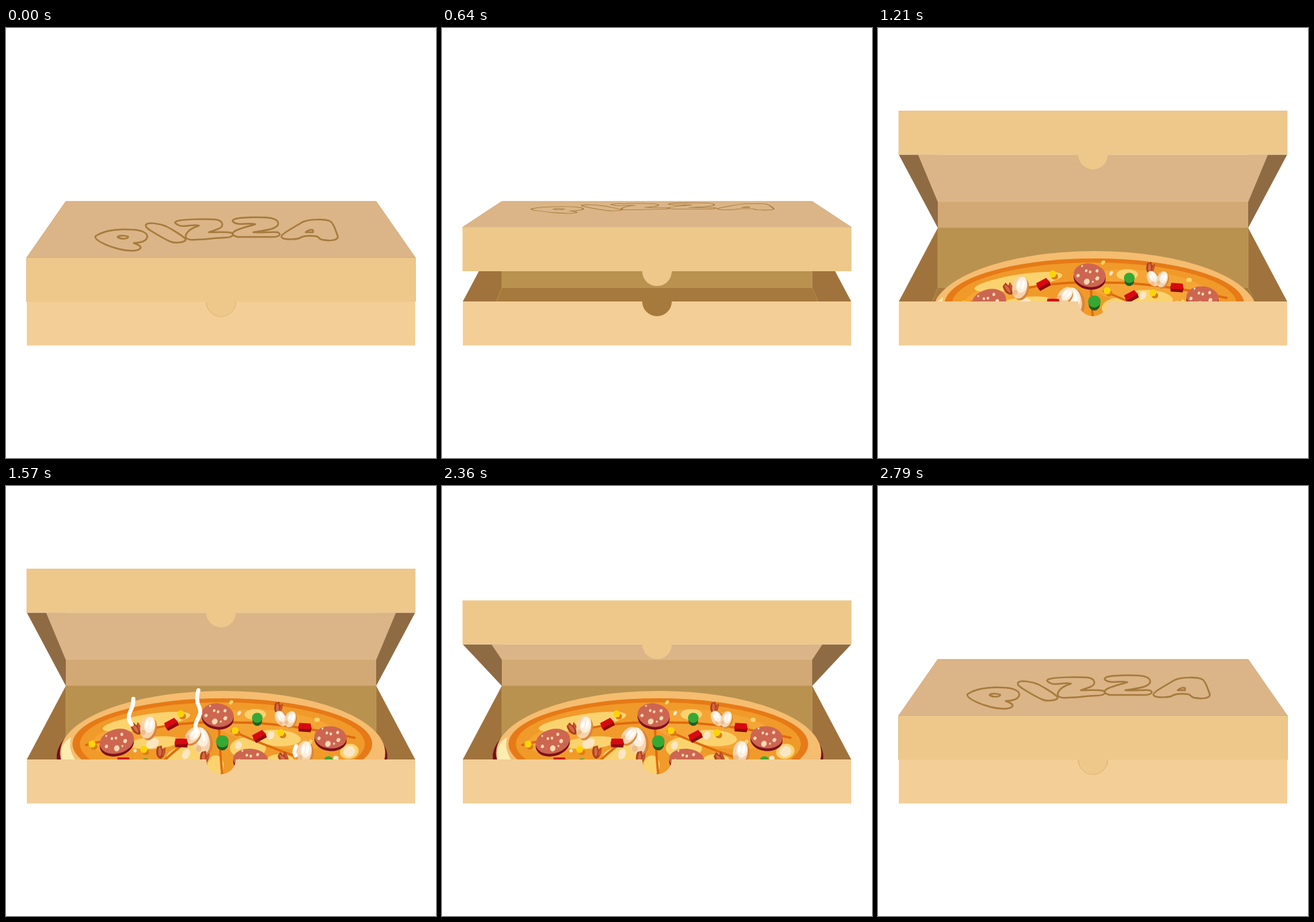
These frames come from a looping animation (640 by 640 pixels, 3430 ms). An HTML page:

```html
<!DOCTYPE html>
<html lang="en">
<head>
<meta charset="utf-8">
<title>Pizza box</title>
<style>
html, body { margin: 0; width: 100%; height: 100%; overflow: hidden; background: #fff; }
svg { display: block; width: 100vw; height: 100vh; }
</style>
</head>
<body>
<svg id="stage" viewBox="0 0 640 640" xmlns="http://www.w3.org/2000/svg"></svg>
<script>
const LOOP = 3430, FPS = 14;
const HINGE = 258, RIM = 297.5, TRAY = 407, FACE = 65.5;
const SHUT = 342, OPEN = 123;

const el = (fill, cx, cy, rx, ry = rx, rot = 0) =>
  `<ellipse cx="${cx}" cy="${cy}" rx="${rx}" ry="${ry}" fill="${fill}" transform="rotate(${rot} ${cx} ${cy})"/>`;
const shape = (fill, d) => `<path fill="${fill}" d="${d}"/>`;
const at = (x, y, rot, s, body) =>
  `<g transform="translate(${x} ${y}) rotate(${rot}) scale(${s})">${body}</g>`;

const salami = (x, y, rx, ry, rot) => {
  const spots = [[-13, -12, 1.3], [-6, -6, 1.9], [0, -5, 1.9], [10, -8, 2.2],
    [-17, 3, 2.3], [-3, 10, 4], [6, 9, 1.4], [12, 3, 2.7]];
  return el('#7d1020', x, y + 4, rx, ry, rot) + el('#cd6650', x, y, rx, ry, rot) +
    at(x, y, rot, 1, spots.map(([a, b, r]) => el('#fbd9b4', a, b, r, r * 1.15, 25)).join(''));
};
const corn = (x, y) => el('#dc7d12', x + 3, y + 4, 5, 4.5) + el('#fdd406', x, y, 5.2);
const pea = (x, y, r) => el('#1d5f22', x, y + 4, r * .9, r) + el('#36a834', x, y, r, r * .95);
const pepper = (x, y, rot) => at(x, y, rot, 1,
  shape('#8f0b14', 'M-10 -1L10 0L9 7L-9 7Z') + shape('#d8090f', 'M-9 -6L8 -6L10 2L-10 3Z'));
const prawn = (x, y, rot, s = 1) => at(x, y, rot, s,
  shape('#a93f24', 'M-6 -7C-8 0 -5 9 1 10C7 8 8 -1 6 -8L2 -4L0 -10Z') +
  shape('#d8683f', 'M-3 -8C-5 -2 -3 5 0 7C3 3 2 -4 -3 -8Z') +
  shape('#c9552f', 'M5 -7C2 -2 3 4 4 6C7 2 7 -3 5 -7Z'));
const mushroom = (x, y, rot, s = 1) => at(x, y, rot, s,
  el('#d9853a', 3, 2, 11, 17) + el('#f6d3ab', 0, 0, 11, 17) + el('#fdeedb', 2, -4, 8, 12) +
  el('#fff', 4, -5, 2.3, 7) + el('#fff', -2, -4, 2, 6) + el('#edbd8c', -5, 9, 3.5, 4));
const pebble = (x, y, rx, ry, rot) => el('#fbe6c4', x, y, rx, ry, rot);
const cheese = (x, y, rx, ry, rot) => el('#fbd36e', x, y, rx, ry, rot);

function pizza() {
  const cuts = ['M118 386C130 382 150 379 165 377', 'M222 360C255 353 290 350 345 352C400 352 460 362 520 375',
    'M317 358Q318 390 322 432', 'M294 362Q262 384 236 408', 'M335 364Q385 386 436 404'];
  return el('#741020', 321.5, 403, 246, 88) + el('#f5bd70', 322.5, 397.5, 242, 92.5) +
    shape('#fdecb0', 'M97 374C82 382 80 396 84 412L106 412C97 399 93 388 97 374Z') +
    el('#e67a17', 322, 384, 223, 68) + el('#f09a2a', 322, 384, 212, 62) +
    el('#f4a535', 405, 362, 95, 27, 8) + el('#f4a535', 175, 376, 48, 20, -12) +
    cheese(209, 351, 66, 11, -9) + cheese(371, 340, 16, 8) + cheese(404, 375, 35, 12, 4) +
    cheese(221, 382, 39, 9, -5) + cheese(271, 399, 32, 13, -8) + cheese(360, 390, 27, 16) +
    cheese(511, 395, 14, 11, -15) + cheese(312, 416, 12, 15) + cheese(408, 408, 20, 9) +
    cuts.map(d => `<path d="${d}" fill="none" stroke="#e06a0c" stroke-width="3.4"/>`).join('') +
    cheese(335, 322, 2.5, 3.5, 40) + pebble(347, 338, 2.3, 3.8, 30) + cheese(463, 348, 4, 3.2) +
    cheese(453, 381, 2.8, 4, 30) + cheese(314, 409, 3, 4.5, 30) + cheese(421, 375, 2.5, 4, 20) +
    pebble(218, 383, 10, 7, -25) + pebble(346, 386, 5, 6, 20) + pebble(394, 371, 5, 6.5, 30) +
    pebble(268, 399, 5.5, 8, 25) + pebble(511, 395, 9, 8, -30) + pebble(491, 405, 4, 3.5) + pebble(192, 394, 2.5) +
    salami(165, 380, 26, 18, -16) + salami(315, 341, 24, 17.5, 8) +
    salami(483, 374, 24, 16.5, 5) + salami(364, 407, 26, 16, 4) +
    prawn(194, 361, -25) + prawn(405, 330, 12, .9) + mushroom(211, 359, 12) +
    mushroom(409, 346, -28, .72) + mushroom(423, 347, 18, .72) +
    mushroom(290, 379, -14, 1.2) + mushroom(278, 371, 40, .85) +
    mushroom(444, 396, 8) + prawn(230, 396, 10) + prawn(295, 404, 15) + prawn(413, 405, -30) +
    [[246, 354, -28], [261, 382, 2], [377, 372, -28], [445, 359, 4], [175, 410, 0]]
      .map(p => pepper(...p)).join('') +
    [[128, 384], [205, 392], [260, 339], [341, 364], [409, 367]].map(p => corn(...p)).join('') +
    pea(374, 345, 8) + pea(322, 380, 9.5) + pea(208, 411, 6) + pea(480, 409, 7);
}

const letters = [
  'M133 310C145 302 165 299 185 300C203 300 212 306 210 312C208 318 198 320 190 320C196 322 202 325 200 328C196 333 180 332 168 329C152 325 131 316 133 310Z',
  'M166 311C169 308 180 309 182 311C180 315 169 314 166 311Z',
  'M209 292C213 289 228 291 238 295C248 300 264 310 267 314C270 319 252 321 245 318C235 314 224 307 216 302C210 298 206 295 209 292Z',
  'M253 288C262 284 300 284 312 285C324 287 325 295 316 299C311 301 305 303 302 304C312 304 330 303 336 305C341 309 334 312 325 312C305 313 285 316 274 315C263 313 268 306 272 302C277 297 286 295 287 294C276 292 264 297 258 294C252 291 250 290 253 288Z',
  'M339 285C346 281 385 281 395 283C408 286 408 294 398 298C390 301 375 303 368 304C380 305 398 303 404 304C412 307 405 311 397 311C378 311 355 311 345 311C335 309 336 304 343 301C352 297 366 294 371 292C362 290 349 293 343 291C337 289 336 287 339 285Z',
  'M410 311C408 307 430 296 441 289C452 284 476 284 483 288C489 292 491 304 494 310C494 317 480 317 470 315C464 313 466 311 462 310C455 309 445 309 440 311C436 315 412 316 410 311Z',
  'M446 304C449 301 455 299 457 301L457 304Z'
];

// Start frame and path of each wisp, bottom to top
const wisps = [
  [19.2, 'M187 355C181 347 182 341 187 331C191 322 190 310 186 300'],
  [18.6, 'M284 365C277 352 291 344 289 334C288 326 284 324 285 320C282 310 290 302 286 293'],
  [21, 'M431 401C425 392 438 384 434 372C431 362 439 356 433 345']
];

const notch = y => `L342 ${y}A22 22 0 0 1 298 ${y}`;
const stage = document.getElementById('stage');
stage.innerHTML = `
<defs><clipPath id="inside"><path d="M0 0H640V440H0Z"/></clipPath></defs>
<path id="lidSides" fill="#8f6b44"/>
<path id="lidBack" fill="#d2a874"/>
<path id="lidInner" fill="#dbb587" stroke="#e6c79e" stroke-width=".5"/>
${shape('#a0733c', 'M31 407L89 297.5H551L609 407Z')}
${shape('#a67a3c', 'M81 407L89 386.5H551L560 407H350V432H290V407Z')}
${shape('#ba924f', 'M89 297.5H551V386.5H89Z')}
<path d="M89 297.5V386.5H551V297.5M89 386.5L81 407M551 386.5L560 407" fill="none" stroke="#c6a062" stroke-width=".5"/>
<g clip-path="url(#inside)"><g id="pizza">${pizza()}</g></g>
${wisps.map(w => `<path class="wisp" d="${w[1]}" pathLength="100" fill="none" stroke="#fff" stroke-width="6" stroke-linecap="round"/>`).join('')}
${shape('#f3ce96', `M31 407H298A22 22 0 0 0 342 407H609V472.5H31Z`)}
<path id="lidTop" fill="#dbb587" stroke="#c79c63" stroke-width=".6"/>
<path id="lidFace" fill="#eec78b"/>
<path id="seam" fill="none" stroke="#d3a868" stroke-width=".6"/>
<g id="label" fill="none" stroke="#a67a3c" stroke-width="2.5" stroke-linejoin="round">
${letters.map(d => `<path d="${d}"/>`).join('')}</g>`;

const $ = id => document.getElementById(id);
const wispEls = [...document.querySelectorAll('.wisp')];
const draw = (id, d) => $(id).setAttribute('d', d);
const clamp = x => Math.max(0, Math.min(1, x));
const smooth = x => (x = clamp(x), x * x * (3 - 2 * x));

// Cubic ease with handles (a, 0) and (b, 1)
function ease(u, a, b) {
  u = clamp(u);
  let lo = 0, hi = 1;
  for (let i = 0; i < 30; i++) {
    const s = (lo + hi) / 2, r = 1 - s;
    if (3 * a * r * r * s + 3 * b * r * s * s + s * s * s < u) lo = s; else hi = s;
  }
  return smooth(lo);
}

function drawLid(y) {
  const low = y + FACE;
  draw('lidFace', `M30.5 ${y}H609.5V${low}${notch(low)}H30.5Z`);
  draw('lidTop', y > HINGE ? `M89 258H551L609.5 ${y}H30.5Z` : '');
  draw('seam', y > SHUT - .5 ? `M30.5 ${y}V${low}M609.5 ${y}V${low}M298 ${low}A22 22 0 0 0 342 ${low}` : '');
  const showIn = low < RIM, top = Math.max(low, HINGE);
  const x = 60 + 15 * Math.pow(Math.max(0, low - 188.5) / 49, 1.7);
  draw('lidSides', showIn ? `M31 ${low}H89V297.5ZM609 ${low}H551V297.5Z` : '');
  draw('lidBack', showIn ? `M89 ${top}H551V297.5H89Z` : '');
  draw('lidInner', low < HINGE ? `M${x} ${low}H${640 - x}L551 258H89Z` : '');
  const k = 1 - (SHUT - y) * .01515, mid = 307 - (SHUT - y) * .856;
  $('label').style.display = k > 0 ? '' : 'none';
  $('label').setAttribute('transform', `translate(0 ${mid}) scale(1 ${Math.max(k, .01)}) translate(0 -307)`);
}

function render(ms) {
  const n = Math.floor((ms % LOOP + 4.3) * FPS / 1000);
  const lift = ease((n - 4) / 10, .8, .677) - ease((n - 28.15) / 9.6, .8, .667);
  drawLid(SHUT + (OPEN - SHUT) * lift);
  $('pizza').setAttribute('transform', `translate(0 ${143 * (1 - smooth((n - 9.2) / 10.8))})`);
  wisps.forEach(([start], i) => {
    const head = clamp((n - start) / 4) * 100, tail = clamp((n - start - 5) / 4) * 100;
    const w = wispEls[i];
    w.style.display = head > tail ? '' : 'none';
    w.setAttribute('stroke-dasharray', `${head - tail} 300`);
    w.setAttribute('stroke-dashoffset', -tail);
  });
}

const begin = performance.now();
function tick() {
  render(performance.now() - begin);
  requestAnimationFrame(tick);
}
tick();
</script>
</body>
</html>
```
